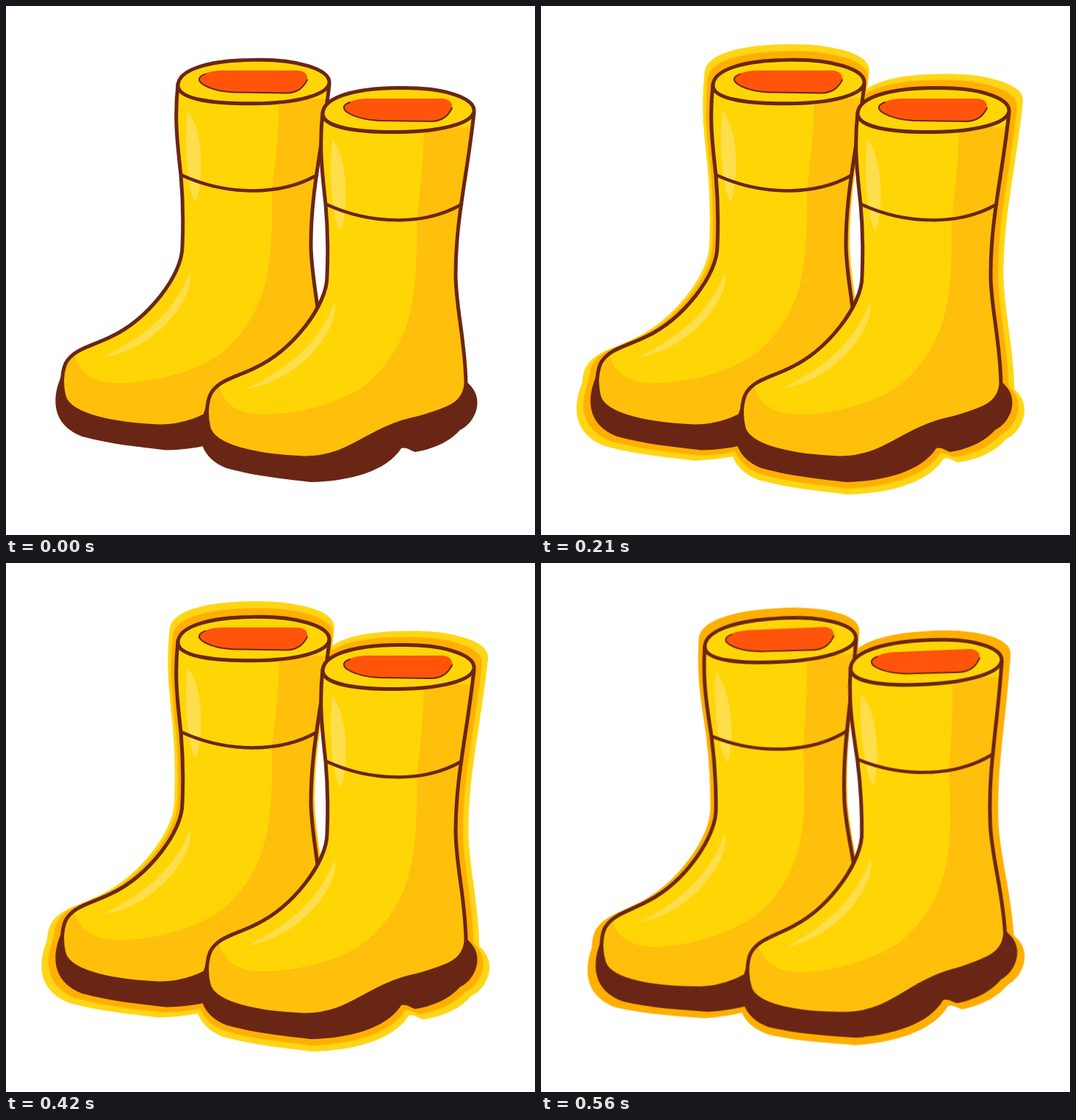
An HTML page that plays this animation: 720x720 px, repeating every 0.63 s.

```html
<!DOCTYPE html>
<html lang="en">
<head>
<meta charset="utf-8">
<title>Rain boots</title>
<style>
  html, body { margin: 0; width: 100%; height: 100%; overflow: hidden; background: #fff; }
  svg { display: block; width: 100vw; height: 100vh; }
  #pair, .ring { transform-origin: 375px 375px; }
  .line { fill: none; stroke: #6a2614; stroke-width: 5; stroke-linejoin: round; stroke-linecap: round; }
  .shine { fill: #ffde4c; }
</style>
</head>
<body>
<svg viewBox="0 0 720 720">
  <defs>
    <path id="body" d="M431 145C426 190 430 225 435 270C439 315 438 345 437 368
      C437 408 390 468 340 492C312 506 288 509 278 529C273 541 272 558 276 574
      C284 602 350 613 405 615C470 616 490 575 560 561C600 549 624 543 626 514
      C625 455 612 410 612 365C612 290 628 230 637 145Z"/>
    <path id="sole" d="M275 540C258 575 258 612 300 629C340 640 375 643 415 648
      C465 647 518 634 538 602C545 600 550 605 557 607C585 602 605 592 618 577
      C638 568 655 533 626 511L520 560L400 600Z"/>
    <path id="rim" d="M431 147C431 125 472 112 533 111.5C592 110 638 124 637 143
      C635 160 592 171 533 171.5C476 172 432 165 431 147Z"/>
    <clipPath id="inside"><use href="#body"/></clipPath>

    <g id="boot">
      <use href="#sole" fill="#6a2614"/>
      <use href="#body" fill="#ffd506"/>
      <g clip-path="url(#inside)">
        <path fill="#ffbf0a" d="M569 165C568 225 561 270 559 292C560 400 553 460 490 515
          C450 545 385 556 350 556C320 556 296 545 289 514H250V640H670V165Z"/>
        <path class="shine" d="M444 182C461 198 469 260 456 306C446 300 438 230 444 182Z"/>
        <path class="shine" d="M447 405C456 425 415 505 328 521C385 492 425 460 447 405Z"/>
      </g>
      <use href="#body" class="line"/>
      <path class="line" style="stroke-width:4.5" d="M436 270C497 298 570 299 620 270"/>
      <use href="#rim" fill="#ffd506"/>
      <use href="#rim" class="line"/>
      <path fill="#ff540a" d="M459 138C464 131 474 126 492 126H594C604 127 608 132 607 139
        C601 149 594 156 580 156.5H508C485 154 458 147 459 138Z"/>
      <path class="line" style="stroke-width:2" d="M468 131C446 139 472 154 508 156L580 157C595 156 602 149 607 139"/>
    </g>

    <g id="flat" fill="currentColor" stroke="currentColor" stroke-width="5" stroke-linejoin="round">
      <use href="#sole" stroke="none"/>
      <use href="#body"/>
      <use href="#rim"/>
    </g>
    <g id="flats">
      <use href="#flat" transform="translate(-197 -37) scale(1 .99)"/>
      <use href="#flat"/>
    </g>
  </defs>

  <g id="pair">
    <use class="ring" href="#flats" color="#ffde4c"/>
    <use class="ring" href="#flats" color="#ffd615"/>
    <use class="ring" href="#flats" color="#ffaf00"/>
    <use href="#boot" transform="translate(-197 -37) scale(1 .99)"/>
    <use href="#boot"/>
  </g>
</svg>
<script>
const beat = 70;
const tilt = [0, -3.4, -3.4, 0, 2.2, 1.6, 0, -2, -2.4];  // degrees on each beat
const spread = [0, 0.037, 0.062, 0.117];                 // growth of the outermost ring, by ring count
const peak = 5;                                          // beat with all rings out

const ringCount = k => 3 - Math.ceil(Math.abs(k - peak) / 2);

// Holds each pose for one beat
function play(el, pose) {
  const n = tilt.length;
  const frames = Array.from({ length: n + 1 }, (_, k) =>
    ({ offset: k / n, easing: "steps(1, end)", ...pose(k % n) }));
  const anim = el.animate(frames, { duration: n * beat, iterations: Infinity });
  anim.startTime = document.timeline.currentTime;
}

play(document.getElementById("pair"), k => ({ transform: `rotate(${tilt[k]}deg)` }));

[...document.querySelectorAll(".ring")].reverse().forEach((el, i) => play(el, k => {
  const count = ringCount(k);
  const shown = i < count;
  const scale = shown ? 1 + spread[count] * (i + 1) / count : 1;
  return { transform: `scale(${scale})`, opacity: shown ? 1 : 0 };
}));
</script>
</body>
</html>
```
